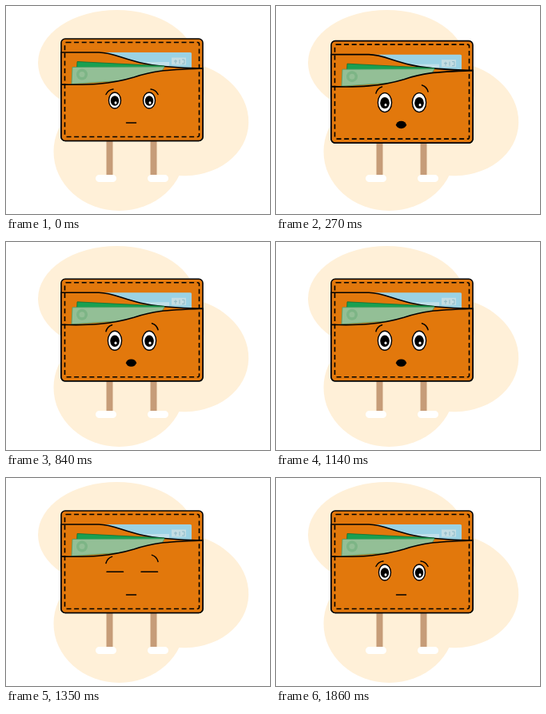
An HTML page for the animation above (2580 ms loop, 330 px wide and 260 px high).

```html
<!DOCTYPE html>
<html lang="en">
<head>
<meta charset="utf-8">
<title>Worried wallet</title>
<style>
html, body { margin: 0; width: 100%; height: 100%; overflow: hidden; background: #fff; }
svg { display: block; width: 330px; height: 260px; }
.leather { fill: #e2780c; stroke: #000; stroke-width: 1.6; }
.line { fill: none; stroke: #000; stroke-width: 1.5; stroke-linecap: round; }
</style>
</head>
<body>
<svg viewBox="0 0 330 260">
  <g fill="#fff0d8">
    <ellipse cx="138.5" cy="71" rx="98.5" ry="66"/>
    <ellipse cx="218" cy="141" rx="85.5" ry="71" transform="rotate(8 218 141)"/>
    <ellipse cx="141.5" cy="182" rx="82" ry="74"/>
  </g>

  <path d="M129.5 160V213M184.5 160V213" stroke="#c69c78" stroke-width="8"/>
  <path d="M116.5 215.5H133.5M181.5 215.5H198.5" stroke="#fff" stroke-width="9" stroke-linecap="round"/>

  <g id="wallet">
    <rect class="leather" x="69" y="41" width="177" height="127.5" rx="5"/>

    <rect x="112" y="58" width="120" height="30" rx="1.5" fill="#9bd2e4"/>
    <path d="M160 70H204V75H160Z" fill="#c0dfe9"/>
    <rect x="207" y="64.5" width="18" height="9" fill="#c4dde3"/>
    <path d="M210 69h4m-2-2v5m5-5v5m3-5h3v5h-3" fill="none" stroke="#8db9c7"/>
    <path class="leather" d="M69 58H116C138 58 154 72 198 75.5Q222 77.5 246 78V110H69Z"/>

    <path d="M89 69.5L198 75L190 88L88 90Z" fill="#19a052" stroke="#0b6f38" stroke-width=".8"/>
    <path d="M83 76.5L198 76L190 90L82 97.5Z" fill="#93bf96" stroke="#4f9f68" stroke-width=".8"/>
    <circle cx="95" cy="85.5" r="7" fill="#7db586"/>
    <circle cx="95" cy="85.5" r="3.5" fill="#93bf96"/>
    <path class="leather" d="M69 98C103 99 130 98 160 89C184 81 196 80 246 78V163.5a5 5 0 0 1-5 5H74a5 5 0 0 1-5-5Z"/>

    <rect x="73.5" y="45.5" width="168" height="118" rx="2" fill="none" stroke="#000" stroke-width="1.6" stroke-dasharray="6 3.6"/>

    <path id="brow" class="line" d="M125 110.5Q128 104.5 134 104"/>
    <g transform="translate(315) scale(-1 1)"><use id="mirrorBrow" href="#browShape"/></g>
    <g id="eyes"></g>
    <path class="line" d="M150.5 146H162.5"/>
    <ellipse id="mouth" cx="156.5" cy="145.8" rx="6.3"/>
  </g>
</svg>

<script>
const LOOP = 2580, STEP = 30;
const $ = id => document.getElementById(id);
const mix = (a, b, k) => a + (b - a) * k;
const ramp = (t, start, length) => Math.min(1, Math.max(0, (t - start) / length));

// Rises from 0 to 1 at one time and falls back at a later one.
const pulse = (t, on, rise, off, fall) => ramp(t, on, rise) - ramp(t, off, fall);

// The right brow is a mirrored copy of the left one.
const rightBrow = $('brow').cloneNode();
$('mirrorBrow').replaceWith(rightBrow);

const oval = (x, y, rx, ry, style) =>
  `<ellipse cx="${x}" cy="${y}" rx="${rx}" ry="${ry}" ${style}/>`;

function eye(x, alarm, gaze, blink) {
  const y = 118, open = 1 - blink;
  if (open < 0.05) return `<path class="line" d="M${x - 10} 117.3h20.5"/>`;
  return oval(x, y, mix(7.5, 8.6, alarm), mix(10, 12, alarm) * open, 'fill="#fff" stroke="#000" stroke-width="1.4"')
    + oval(x + gaze, y + 0.5, mix(5.2, 5.8, alarm), mix(6.2, 7.2, alarm) * open, '')
    + oval(x + gaze + 1, y + 3 * open, 1.5, 1.7 * open, 'fill="#fff"');
}

function raise(brow, lift, alarm) {
  brow.setAttribute('transform',
    `translate(${-alarm} ${-lift * alarm}) rotate(${-11 * alarm} 129.5 106)`);
}

function draw(now) {
  const t = Math.floor(now % LOOP / STEP) * STEP;
  const drop = 5.3 * pulse(t, 0, 540, 1140, 210);
  const alarm = pulse(t, 0, 180, 1680, 180);
  const gape = pulse(t, 0, 180, 1200, 150);
  const gaze = -3.2 * pulse(t, 420, 150, 720, 120);
  const blink = pulse(t, 930, 60, 990, 30) + pulse(t, 1260, 90, 1410, 90);

  $('wallet').setAttribute('transform', `translate(0 ${drop})`);
  raise($('brow'), 4.8, alarm);
  raise(rightBrow, 6.8, alarm);
  $('eyes').innerHTML = eye(136, alarm, gaze, blink) + eye(179, alarm, gaze * 0.65, blink);
  $('mouth').setAttribute('ry', 4.7 * gape);
}

let start;
function tick(now) {
  start ??= now;
  draw(now - start);
  requestAnimationFrame(tick);
}
draw(0);
requestAnimationFrame(tick);
</script>
</body>
</html>
```
